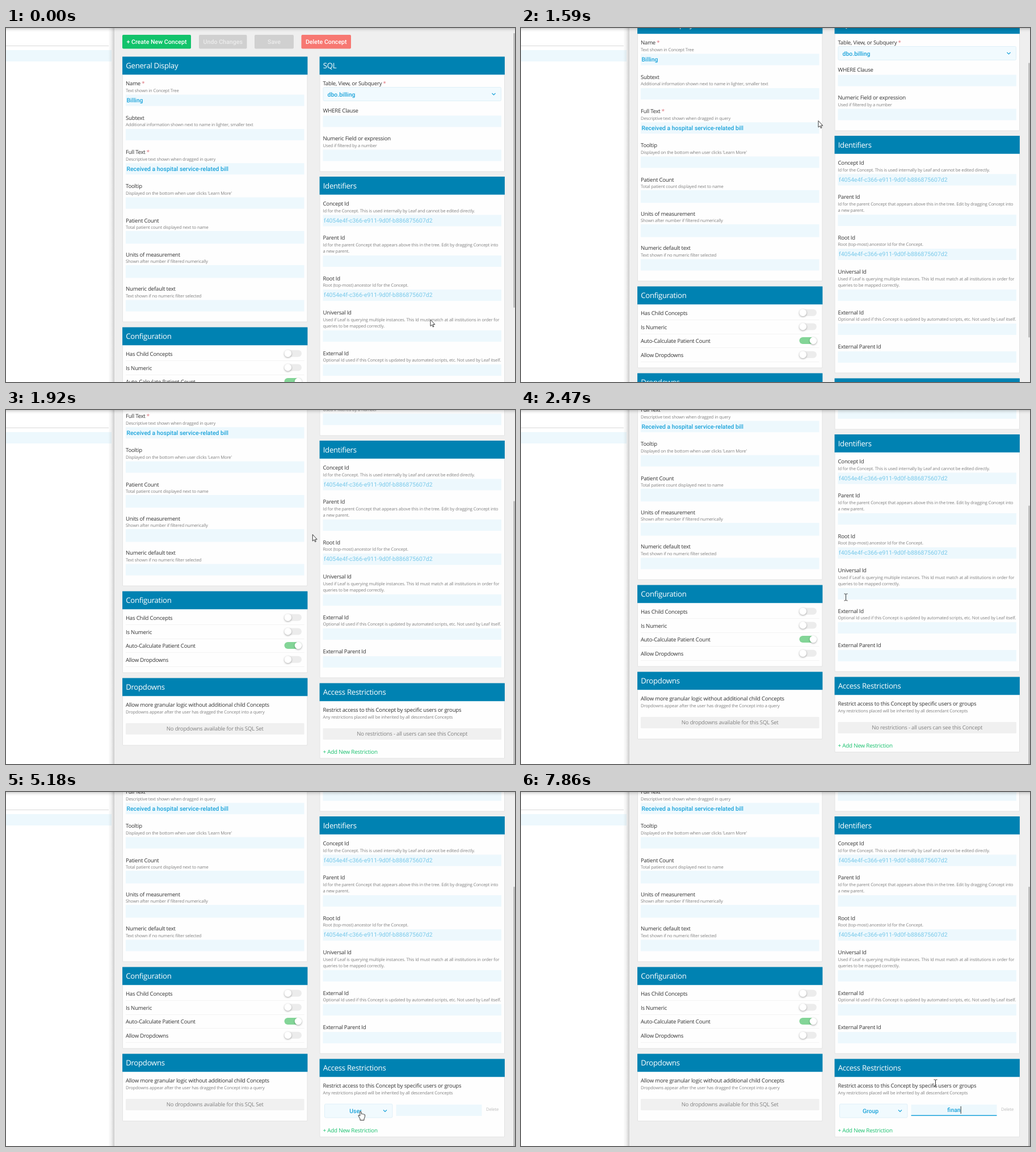
Recreate the animation shown at these times as an HTML page with a canvas. Size 897 by 624 pixels, loop 8 s.

```html
<!DOCTYPE html>
<html lang="en">
<head>
<meta charset="utf-8">
<title>Concept editor</title>
<style>
html, body { margin: 0; width: 100%; height: 100%; overflow: hidden; background: #fff; }
canvas { display: block; }
</style>
</head>
<body>
<canvas id="stage" width="897" height="624"></canvas>
<script>
const ctx = document.getElementById('stage').getContext('2d');
const LOOP = 8000;
const INK = '#333', GREY = '#808080', BLUE = '#1ba3da', PALE = '#79c9ea', HEAD = '#0082b2',
      FIELD = '#edf8fd', GREEN = '#16c06c', LEFT = 205.5, RIGHT = 553;
const SANS = '"Open Sans", "Noto Sans", sans-serif', ROBOTO = 'Roboto, sans-serif';
const ID = 'f4054e4f-c366-e911-9d0f-b886875607d2';

// Cursor keys: time, x, y, shape
const PATH = [
  [0, 748, 514, 'arrow'], [69, 748, 514, 'arrow'], [70, 470, 360, 'arrow'], [130, 240, 200, 'arrow'],
  [200, 416.5, 125, 'beam'], [339, 416.5, 125, 'beam'], [420, 450, 133, 'beam'], [500, 500, 150, 'arrow'],
  [650, 540, 173, 'arrow'], [960, 540, 173, 'arrow'], [1120, 524, 163.5, 'arrow'],
  [1800, 524, 163.5, 'arrow'], [2160, 572.5, 330, 'beam'], [2480, 572.5, 330, 'beam'],
  [2700, 592, 410, 'arrow'], [2950, 625, 535, 'arrow'], [3140, 622, 583, 'hand'], [3300, 617.5, 585, 'hand'],
  [4380, 617.5, 585, 'hand'], [4550, 636, 540, 'arrow'], [4680, 648, 508, 'arrow'], [4900, 640, 550, 'hand'],
  [5180, 625, 563, 'hand'], [5500, 625, 563, 'hand'], [6000, 633.5, 537, 'hand'],
  [6380, 633.5, 537, 'hand'], [6480, 662, 545, 'arrow'], [6560, 695, 553, 'beam'], [6620, 719, 557, 'beam'],
  [6860, 719, 557, 'beam'], [7030, 730.5, 513, 'beam'], [LOOP, 730.5, 513, 'beam']
];
const CLICKS = [[4000, 4160], [5240, 5400], [6070, 6240]];
const SCROLL = [2, 24, 72, 130, 174.5, 196, 208, 214, 217, 219];
const TYPED = [7480, 7560, 7630, 7710, 7860];

const SHAPES = {
  arrow: new Path2D('M0 0V11.5L2.6 9.2L4.4 13L6 12.3L4.3 8.6H7.9Z'),
  hand: new Path2D('M-1.2 1V8L-3 6.6Q-4.2 6.4-4 8L-1 13V15.5H6V13L7.5 9.5V6Q7 4.6 5.6 5.4Q5 4 3.6 4.8Q2.6 3.8 1.2 4.6V1Q0-.8-1.2 1Z'),
  beam: new Path2D('M-3-6H-1L0-5L1-6H3M0-5V5M-3 6H-1L0 5L1 6H3')
};

function box(x, y, w, h, fill, radius = 0, border) {
  ctx.beginPath();
  ctx.roundRect(x, y, w, h, radius);
  ctx.fillStyle = fill;
  ctx.fill();
  if (border) {
    ctx.strokeStyle = border;
    ctx.lineWidth = 1;
    ctx.stroke();
  }
}

// Writes text whose capitals are centred on y; returns its width.
function write(str, x, y, size, color, { face = SANS, weight = 400, align = 'left' } = {}) {
  ctx.font = `${weight} ${size}px ${face}`;
  ctx.letterSpacing = face === SANS ? `${-0.0217 * size}px` : '0px';
  ctx.textRendering = 'geometricPrecision';
  ctx.textAlign = align;
  ctx.fillStyle = color;
  ctx.fillText(str, x, y + size * 0.36);
  return ctx.measureText(str).width;
}

const small = (str, x, y, color = GREY) => write(str, x, y, 7.7, color);
const value = (str, x, y, align) => write(str, x, y, 10.45, BLUE, { face: ROBOTO, weight: 500, align });

function label(str, x, y) {
  const required = str.endsWith('*');
  const w = write(required ? str.slice(0, -1) : str, x, y, 9.6, INK);
  if (required) write('*', x + w, y, 9.6, '#dc7078');
}

function shadowed(blur, color, draw) {
  ctx.save();
  ctx.shadowBlur = blur;
  ctx.shadowColor = color;
  ctx.shadowOffsetY = 1;
  draw();
  ctx.restore();
}

function card(x, top, bottom, title) {
  box(x, top, 325.5, bottom - top, '#fefefe', 1, '#e2e2e2');
  box(x - 0.4, top - 0.4, 326.3, 31.6, HEAD);
  write(title, x + 5.7, top + 15.6, 13.2, '#fff', { weight: 500 });
}

// Number fields are a little taller than text fields. Returns the field's top edge.
function field(x, y, name, notes, numeric) {
  label(name, x, y);
  notes.forEach((note, i) => small(note, x, y + 12.2 + i * 11.3));
  const top = y + (notes.length ? 8.2 + notes.length * 11.4 : 8.4);
  if (numeric) box(x, top - 1, 314.5, 22.5, FIELD);
  else box(x, top, 314.5, 20, FIELD);
  return top;
}

function idField(y, name, note) {
  const top = field(558.5, y, name, [note]);
  write(ID, 560, top + 9.6, 10.45, PALE, { face: ROBOTO });
}

function chevron(x, y) {
  ctx.beginPath();
  ctx.moveTo(x - 3, y - 1.5);
  ctx.lineTo(x, y + 1.5);
  ctx.lineTo(x + 3, y - 1.5);
  ctx.strokeStyle = BLUE;
  ctx.lineWidth = 1.2;
  ctx.stroke();
}

function select(x, y, w) {
  box(x + 0.5, y + 0.5, w - 1, 24, '#f1fafe', 2, '#dff0f8');
  chevron(x + w - 13.5, y + 12.5);
}

function toggle(y, on) {
  box(490.5, y - 6, 30.5, 12, on ? '#83d597' : '#ececec', 6);
  shadowed(3, 'rgba(0,0,0,.35)', () => box(on ? 508.7 : 490.5, y - 6.3, 12.6, 12.6, '#fff', 6.3));
}

function notice(x, y, str) {
  box(x, y, 314.5, 20, '#f0f0f0', 1);
  write(str, x + 157.2, y + 10, 9.6, GREY, { align: 'center' });
}

function button(x, w, str, fill, color = '#fff') {
  box(x, 12, w, 24.5, fill, 2);
  write(str, x + w / 2, 24, 10.65, color, { face: ROBOTO, weight: 500, align: 'center' });
}

function leftColumn() {
  const x = 211;
  card(LEFT, 51, 518, 'General Display');
  [
    ['Name *', 'Text shown in Concept Tree', 'Billing'],
    ['Subtext', 'Additional information shown next to name in lighter, smaller text'],
    ['Full Text *', 'Descriptive text shown when dragged in query', 'Received a hospital service-related bill'],
    ['Tooltip', "Displayed on the bottom when user clicks 'Learn More'"],
    ['Patient Count', 'Total patient count displayed next to name'],
    ['Units of measurement', 'Shown after number if filtered numerically'],
    ['Numeric default text', 'Text shown if no numeric filter selected']
  ].forEach(([name, note, text], i) => {
    const top = field(x, 98 + i * 60.3, name, [note], i === 4 || i === 5);
    if (text) value(text, x + 1.5, top + 9.7);
  });

  card(LEFT, 528, 671, 'Configuration');
  ['Has Child Concepts', 'Is Numeric', 'Auto-Calculate Patient Count', 'Allow Dropdowns'].forEach((name, i) => {
    const y = 574.5 + i * 24.7;
    label(name, x, y);
    box(x, Math.round(y + 11.5), 314.5, 1, '#f3f3f3');
    toggle(y - 0.8, i === 2);
  });

  card(LEFT, 681, 799, 'Dropdowns');
  label('Allow more granular logic without additional child Concepts', x, 728);
  small('Dropdowns appear after the user has dragged the Concept into a query', x, 740);
  notice(x, 760, 'No dropdowns available for this SQL Set');
}

function rightColumn(t) {
  const x = 558.5;
  card(RIGHT, 51, 253, 'SQL');
  label('Table, View, or Subquery *', x, 98);
  select(x, 104, 314.5);
  value('dbo.billing', 566.5, 117);
  field(x, 146, 'WHERE Clause', []);
  field(x, 195, 'Numeric Field or expression', ['Used if filtered by a number']);

  card(RIGHT, 262.5, 680, 'Identifiers');
  idField(310, 'Concept Id', 'Id for the Concept. This is used internally by Leaf and cannot be edited directly.');
  field(x, 370, 'Parent Id', ['Id for the parent Concept that appears above this in the tree. Edit by dragging Concept into', 'a new parent.']);
  idField(441.5, 'Root Id', 'Root (top-most) ancestor Id for the Concept.');
  field(x, 502, 'Universal Id', ['Used if Leaf is querying multiple instances. This Id must match at all institutions in order for', 'queries to be mapped correctly.']);
  field(x, 573.5, 'External Id', ['Optional Id used if this Concept is updated by automated scripts, etc. Not used by Leaf itself.']);
  field(x, 633.5, 'External Parent Id', []);

  const added = t >= 4160;
  card(RIGHT, 690, added ? 827 : 822, 'Access Restrictions');
  label('Restrict access to this Concept by specific users or groups', x, 736.5);
  small('Any restrictions placed will be inherited by all descendant Concepts', x, 749);
  if (added) restriction(t);
  else notice(x, 769, 'No restrictions - all users can see this Concept');

  const y = added ? 815 : 810;
  const w = write('+ Add New Restriction', x, y, 9.85, GREEN);
  if (t >= 3100 && t < 4400) box(x, y + 4.6, w, 0.9, GREEN);
}

function restriction(t) {
  select(561, 768.5, 120.5);
  value(t < 6240 ? 'User' : 'Group', 616, 781, 'center');
  box(687.5, 770, 151, 20, FIELD);
  small('Delete', 846, 778.5, '#bdbdbd');
  if (t >= 6840) {
    box(687.5, 788.5, 151, 1.5, BLUE);
    const str = 'finan'.slice(0, TYPED.filter(k => t >= k).length);
    const w = str ? value(str, 763, 779.5, 'center') : 0;
    if (t < 7340 || str) box(763 + w / 2, 773, 1, 13, INK);
  }
}

function menu(cursorY) {
  shadowed(7, 'rgba(0,0,0,.4)', () => box(561.5, 501, 96, 48.5, '#fff', 1));
  const over = cursorY < 525 ? 505.5 : cursorY < 545 ? 525 : 0;
  if (over) box(561.5, over, 96, 19.5, '#ebf6fc');
  write('User', 576, 515, 9.6, INK);
  write('Group', 576, 534.5, 9.6, INK);
}

function shade(x0, y0, x1, y1, strength, w, h) {
  const g = ctx.createLinearGradient(x0, y0, x1, y1);
  g.addColorStop(0, `rgba(0,0,0,${strength})`);
  g.addColorStop(0.5, `rgba(0,0,0,${strength * 0.3})`);
  g.addColorStop(1, 'rgba(0,0,0,0)');
  ctx.fillStyle = g;
  ctx.fillRect(Math.min(x0, x1), 0, w, h);
}

function cursorAt(t) {
  const i = PATH.findIndex(k => k[0] > t);
  const [t0, x0, y0, shape] = PATH[i - 1], [t1, x1, y1] = PATH[i];
  const p = (t - t0) / (t1 - t0);
  return { x: x0 + (x1 - x0) * p, y: y0 + (y1 - y0) * p, shape };
}

function drawCursor({ x, y, shape }, t) {
  ctx.save();
  ctx.translate(x, y);
  if (CLICKS.some(([a, b]) => t >= a && t < b)) box(-8.5, -8.7, 16.4, 16.4, 'rgba(250,238,20,.82)', 8.2);
  ctx.lineWidth = 0.9;
  ctx.strokeStyle = '#222';
  if (shape !== 'beam') {
    ctx.fillStyle = '#fff';
    ctx.fill(SHAPES[shape]);
  }
  ctx.stroke(SHAPES[shape]);
  ctx.restore();
}

function scrollAt(t) {
  return t < 1430 ? 0 : SCROLL[Math.min(9, Math.floor((t - 1430) / 77.5))];
}

function draw(t) {
  const scroll = scrollAt(t), cursor = cursorAt(t);
  box(0, 0, 897, 624, '#fff');
  box(0, 31, 181, 1, '#d9d9d9');
  box(0, 39, 186, 20, FIELD);
  shade(191, 0, 180, 0, 0.2, 11, 624);
  box(191, 0, 706, 624, '#efefef');

  ctx.save();
  ctx.translate(0, -scroll);
  button(205, 121, '+ Create New Concept', '#12c36b');
  button(340, 84.5, 'Undo Changes', '#d0d0d0', '#ececec');
  button(438, 69, 'Save', '#d0d0d0', '#ececec');
  button(520.5, 87.5, 'Delete Concept', '#f77872');
  leftColumn();
  rightColumn(t);
  ctx.restore();

  if (t >= 5400 && t < 6240) menu(cursor.y);
  box(894, 9 + scroll * 0.728 - (t >= 4160 ? 1.5 : 0), 3, 484, '#bfbfbf', 1);
  shade(0, 0, 0, 7, 0.18, 897, 7);
  drawCursor(cursor, t);
}

const start = performance.now();
function tick() {
  draw((performance.now() - start) % LOOP);
  requestAnimationFrame(tick);
}
tick();
</script>
</body>
</html>
```
